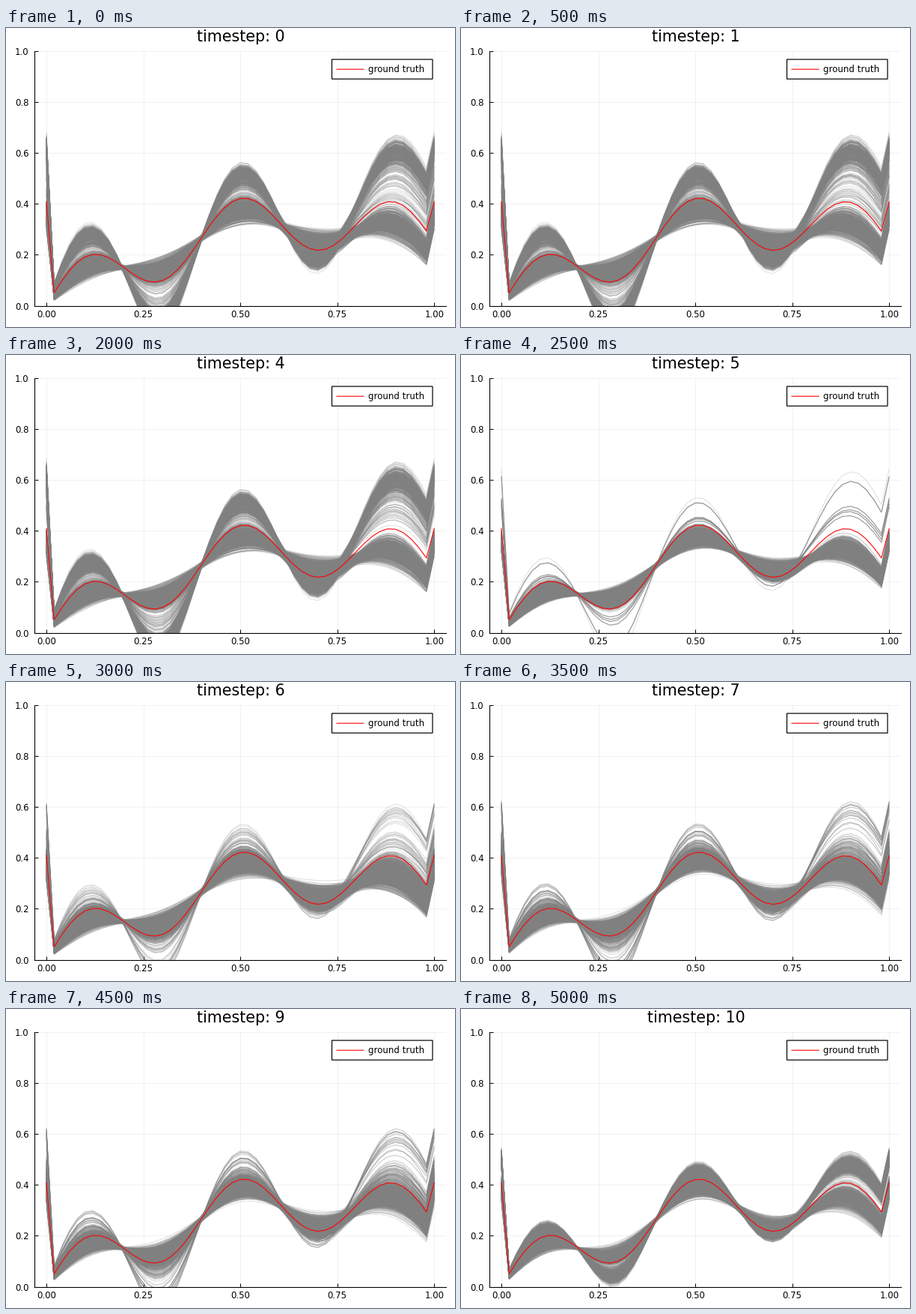
Animation of 600x400 px, one loop 5.5 s. Source, as a matplotlib script:

```python
import numpy as np
import matplotlib.pyplot as plt
from matplotlib.animation import FuncAnimation
from matplotlib.collections import LineCollection
from matplotlib.patches import Rectangle

W, H, DPI = 600, 400, 100
PX = 72 / DPI
STEPS, INTERVAL = 11, 500
LEFT, BOTTOM, AX_W, AX_H = 38.45, 28.4, 549.3, 341

plt.rcParams["font.family"] = "DejaVu Sans"

X = np.linspace(0, 1, 51)
TREND = .33 * np.sin(.75 * np.pi * X)
WAVE = np.sin(5 * np.pi * X)
DIP = np.exp(-((X - .29) / .07) ** 2)


def curve(amp, tail, dip=0, lift=0, jump=.14):
    """Rising trend plus a wave; both ends share one raised value."""
    y = TREND + amp * WAVE + tail * X ** 4 - dip * DIP + lift * np.sin(np.pi * X)
    y[..., -1] = y[..., -2] + jump
    y[..., 0] = y[..., -1]
    return y


def bundle(rng, lo, hi, count, noise, copies=1):
    """Curves from the flat family (u = 0) to the steep one (u = 1)."""
    u = lo + (hi - lo) * rng.random((count, 1))
    da, dt, dl = noise * rng.triangular(-1.1, 0, 1.1, (3, count, 1))
    y = curve(.073 + .127 * u + .052 * da, -.055 + .255 * u + .045 * dt,
              .09 * u ** 2, .014 * dl)
    return np.repeat(y, copies, axis=0)


def groups(step):
    """Seed and bundles (lo, hi, count, noise, copies) for a step."""
    if step < 5:
        return 3, [(-.04, .04, 600, 1), (.9, 1.04, 330, .85),
                   (.2 + .065 * step, .9, 90, .6)]
    if step == 5:
        return 8, [(-.03, .05, 900, .85), (.45, .6, 4, .4, 5),
                   (.95, .95, 1, .2, 6), (1.04, 1.04, 1, .2)]
    if step == 6:
        return 12, [(-.05, .15, 880, 1), (.2, .6, 60, .8), (.72, .98, 20, .5)]
    if step < 10:
        return 15, [(0, .22, 800, .85), (.2, .5, 110, .9), (.75, .98, 16, .5, 2)]
    return 21, [(0, .2, 480, .65), (.45, .62, 480, .5), (0, .3, 20, 1.1)]


def cloud(step):
    seed, parts = groups(step)
    rng = np.random.default_rng(seed)
    y = np.vstack([bundle(rng, *p) for p in parts])
    rng.shuffle(y)
    return np.stack([np.broadcast_to(X, y.shape), y], axis=-1)


CLOUDS = [cloud(s) for s in range(STEPS)]

fig = plt.figure(figsize=(W / DPI, H / DPI), dpi=DPI, facecolor="white")
ax = fig.add_axes([LEFT / W, BOTTOM / H, AX_W / W, AX_H / H])
ax.set(xlim=(-.03, 1.03), ylim=(0, 1))
ax.set_axisbelow(True)
ax.grid(color="black", alpha=.055, lw=PX)
ax.set_xticks(np.linspace(0, 1, 5))
ax.set_yticks(np.linspace(0, 1, 6))
ax.tick_params(direction="in", length=5 * PX, width=PX, labelsize=11.8 * PX)
ax.tick_params(axis="x", pad=5.5 * PX)
ax.tick_params(axis="y", pad=8 * PX)
ax.spines[["top", "right"]].set_visible(False)
ax.spines[["left", "bottom"]].set_linewidth(1.1 * PX)

lines = LineCollection([], colors="#808080", alpha=.25, linewidths=PX, zorder=2)
ax.add_collection(lines, autolim=False)
ax.plot(X, curve(.115, .015, jump=.115), color="red", lw=1.1 * PX, zorder=2.2)

# Overlay in pixel coordinates for title and legend.
top = fig.add_axes([0, 0, 1, 1])
top.set(xlim=(0, W), ylim=(H, 0))
top.axis("off")
title = top.text(314, 18.4, "", fontsize=20.7 * PX, ha="center", va="baseline")
top.add_patch(Rectangle((435.5, 42), 134.5, 26.2, fc="white", ec="black",
                        lw=1.2 * PX, snap=False))
top.plot([442, 478], [55.2, 55.2], color="red", lw=1.1 * PX, snap=False)
top.text(483.5, 59, "ground truth", fontsize=11.8 * PX, va="baseline")


def draw(step):
    lines.set_segments(CLOUDS[step])
    title.set_text(f"timestep: {step}")
    return lines, title


anim = FuncAnimation(fig, draw, frames=STEPS, interval=INTERVAL, repeat=True, repeat_delay=0)
plt.show()
```
